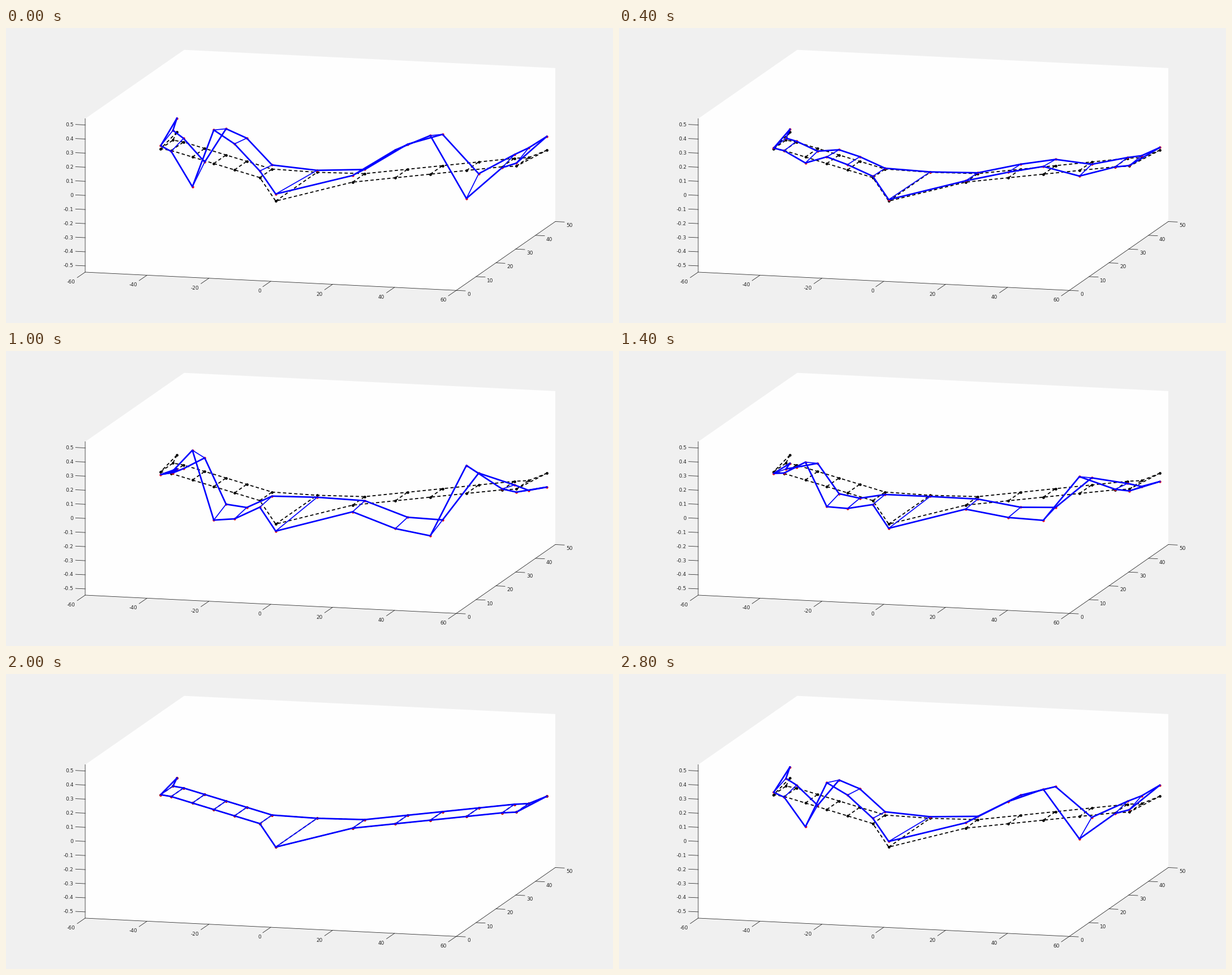
Recreate the animation shown at these times as a matplotlib script. Size 1073x522 px, loop 3 s.

```python
import matplotlib.pyplot as plt
import numpy as np
from matplotlib.animation import FuncAnimation

W, H, DPI = 1073, 522, 100
PX = 72 / DPI  # points per pixel
INK = "#262626"
Z_MAX = 0.5445

plt.rcParams["font.family"] = "DejaVu Sans"
fig = plt.figure(figsize=(W / DPI, H / DPI), dpi=DPI, facecolor="#f0f0f0")
ax = fig.add_axes([0, 0, 1, 1])
ax.set_xlim(0, W)
ax.set_ylim(H, 0)
ax.axis("off")


def project(x, y, z):
    """Orthographic view of the plot box, in stage pixels."""
    return (140 + 5.467 * (x + 60) + 3.5 * y,
            296.2 + 0.269 * (x + 60) - 2.436 * y - 249.4 * z)


# Half wing from root to tip: span stations and mode shape of each spar.
SPAN = np.array([0, 15, 26, 35, 44.3, 53.5, 57.5, 59.8])
FRONT_LIFT = np.array([0.05, 0.047, 0.191, 0.256, -0.205, -0.006, 0.021, 0.098])
BACK_LIFT = np.array([0.014, 0.029, 0.171, 0.204, -0.09, 0.026, 0.069, 0.098])
TIP_Y = 46


def spar(root_y, offset, lift):
    """Swept spar on both sides, with slightly more lift on the right."""
    y = 17.9 + offset + 0.4 * (SPAN - 15) - 0.17 * np.maximum(SPAN - 53.5, 0)
    y[0], y[-1] = root_y, TIP_Y
    skew = 0.018 * np.exp(-((SPAN - 35) / 9) ** 2)
    x = np.append(-SPAN[:0:-1], SPAN)
    return x, np.append(y[:0:-1], y), np.append((lift - skew)[:0:-1], lift + skew)


front = spar(2.5, 0, FRONT_LIFT)
back = spar(23.4, 6.2, BACK_LIFT)


def wing(amp):
    """Both spars, the ribs as one broken line, and all joints."""
    b, f = (np.array(project(x, y, amp * z)) for x, y, z in (back, front))
    inner_f, inner_b = f[:, 1:-1], b[:, 1:-1]
    gap = np.full_like(inner_f, np.nan)
    ribs = np.stack([inner_f, inner_b, gap], axis=2).reshape(2, -1)
    return b, f, ribs, np.hstack([b, inner_f])


def line(xs, ys, color, width, **kw):
    return ax.plot(xs, ys, color=color, lw=width * PX, **kw)[0]


def dots(xs, ys, color, size):
    return ax.plot(xs, ys, "o", color=color, ms=size * PX, mew=0)[0]


def tick(point, step, text_shift, value, align):
    (x, y), (dx, dy), (tx, ty) = point, step, text_shift
    line([x, x + dx], [y, y + dy], INK, 0.8)
    ax.text(x + dx + tx, y + dy + ty + 3.3, f"{value:g}", ha=align,
            va="baseline", fontsize=9 * PX, color=INK)


def draw_box():
    outline = [(-60, 0, 1), (-60, 50, 1), (60, 50, 1),
               (60, 50, -1), (60, 0, -1), (-60, 0, -1)]
    corners = [project(x, y, side * Z_MAX) for x, y, side in outline]
    ax.add_patch(plt.Polygon(corners, fc="#fefefe", ec="none"))
    line(*zip(*corners[3:], corners[0]), INK, 0.8)

    for z in range(-5, 6):
        tick(project(-60, 0, z / 10), (-17, -0.8), (-3.7, 0), z / 10, "right")
    for x in range(-60, 61, 20):
        tick(project(x, 0, -Z_MAX), (-14, 9.6), (-3.3, 7.2), x, "right")
    for y in range(0, 51, 10):
        tick(project(60, y, -Z_MAX), (16, 0.8), (3, 5.8), y, "left")


def draw_rest():
    *lines, joints = wing(0)
    for xs, ys in lines:
        line(xs, ys, "black", 1.8, dashes=(3.2, 2.3))
    dots(*joints, "black", 4.8)


draw_box()
draw_rest()
*lines, joints = wing(1)
joint_dots = dots(*joints, "red", 4.4)
parts = [line(*xy, "blue", w) for xy, w in zip(lines, (2.7, 2.7, 1.7))]
parts.append(joint_dots)


def update(i):
    # Quick stroke down, then a return at half the speed.
    amp = np.interp(i, [0, 5, 15], [1, -1, 1])
    for part, (xs, ys) in zip(parts, wing(amp)):
        part.set_data(xs, ys)
    return parts


anim = FuncAnimation(fig, update, frames=15, interval=200, repeat=True,
                     repeat_delay=0)
plt.show()
```
